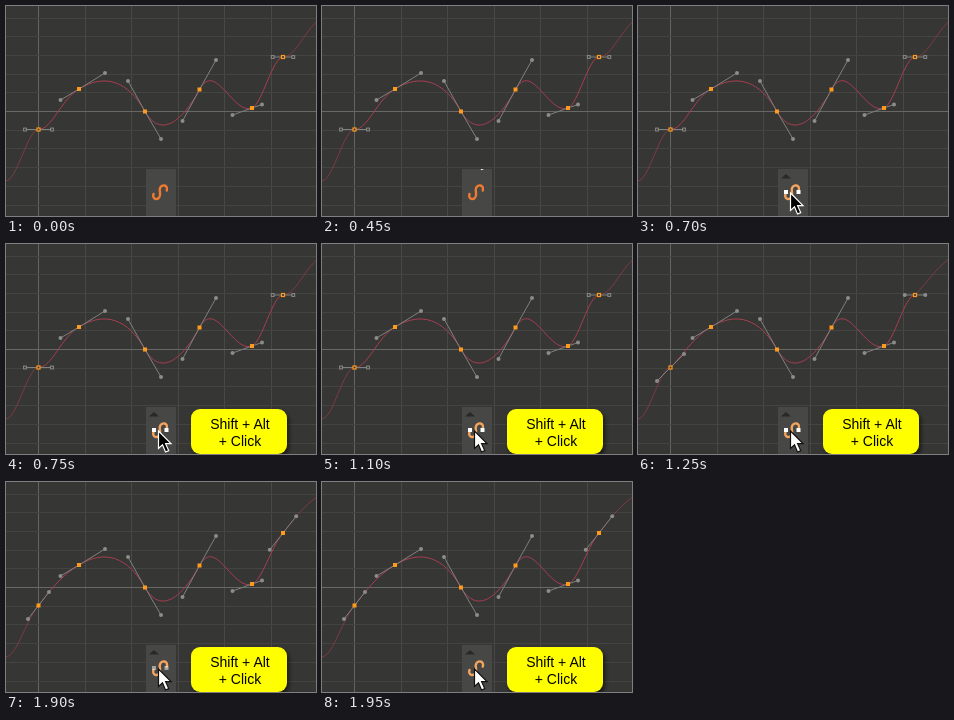
Write an HTML page that moves like this. It is 310 by 210 pixels and loops after 2.4 s.

```html
<!DOCTYPE html>
<html lang="en">
<head>
<meta charset="utf-8">
<title>Curve tangents</title>
<style>
html, body { margin: 0; width: 100%; height: 100%; overflow: hidden; background: #363634; }
svg { display: block; width: 310px; height: 210px; }
text { font: 14px "Liberation Sans", Arial, sans-serif; text-anchor: middle; }
</style>
</head>
<body>
<svg viewBox="0 0 310 210">
  <defs>
    <clipPath id="slot"><rect x="140" y="163" width="30" height="47"/></clipPath>
    <filter id="soft" x="-20%" y="-20%" width="140%" height="150%"><feGaussianBlur stdDeviation="2"/></filter>
  </defs>
  <g id="grid" shape-rendering="crispEdges"></g>
  <g fill="none" stroke="#a83e50">
    <path id="outside" opacity=".6"/>
    <path id="curve"/>
  </g>
  <g id="keys"></g>
  <rect x="140" y="163" width="30" height="47" fill="#474745"/>
  <path id="arrow" d="M143 172.5L148 168L153 172.5Z" fill="#292928"/>
  <path id="icon" d="M147.5 188C145.5 194 153.5 195 154 189C154.3 186 153.5 185 153.8 183C154.5 178 162.5 178 160.8 184.5" fill="none" stroke-width="2.4" stroke-linecap="round"/>
  <path id="grips" d="M146 184h4v4h-4zM158.5 184h4v4h-4z" fill="#fff"/>
  <g clip-path="url(#slot)">
    <path id="cursor" d="M0 0V17.5L4 13.8L7 21L10.2 19.6L7.1 12.7H12.5Z" stroke-width="1.2"/>
  </g>
  <g id="label">
    <rect x="187" y="168" width="96" height="45" rx="9" opacity=".55" filter="url(#soft)"/>
    <rect x="185" y="165" width="96" height="45" rx="9" fill="#ff0"/>
    <text x="234" y="185">Shift + Alt</text>
    <text x="234" y="202">+ Click</text>
  </g>
</svg>
<script>
const $ = id => document.getElementById(id);
const set = (id, name, value) => $(id).setAttribute(name, value);
const show = (id, on) => set(id, 'visibility', on ? 'visible' : 'hidden');
const ramp = (t, a, b) => Math.min(1, Math.max(0, (t - a) / (b - a)));
const mix = (a, b, p) => a + (b - a) * p;

const line = (x, y, w, h, c) => `<rect x="${x}" y="${y}" width="${w}" height="${h}" fill="${c}"/>`;
let grid = '';
for (let i = 0; i < 6; i++) grid += line(Math.round(32 + i * 46.5), 0, 1, 210, i ? '#484846' : '#646462');
for (let i = -5; i < 6; i++) grid += line(0, Math.round(105 + i * 18.7), 310, 1, i ? '#434341' : '#686866');
$('grid').innerHTML = grid;

// Each key: point, left handle, right handle
const inner = [
  [73, 83, 54.5, 94, 99, 67],
  [139, 105.5, 122, 75, 155, 133],
  [193.5, 83.5, 176.5, 115, 210, 54],
  [246, 102, 226.5, 109, 256, 98.5]
];

function keysAt(t) {
  const rise = ramp(t, 1100, 1250), narrow = ramp(t, 1250, 1350);
  const dx = mix(13.5, 10.5, narrow), dy = 13.5 * rise;
  const ex = mix(10.3, 13.2, narrow), ey = 16.7 * narrow;
  return [
    [32.5, 123.5, 32.5 - dx, 123.5 + dy, 32.5 + dx, 123.5 - dy],
    ...inner,
    [277, 51, 277 - ex, 51 + ey, 277 + ex, 51 - ey]
  ];
}

const segment = (a, b, dx = 0, dy = 0) =>
  `M${a[0] + dx} ${a[1] + dy}C${a[4] + dx} ${a[5] + dy} ${b[2] + dx} ${b[3] + dy} ${b[0] + dx} ${b[1] + dy}`;

const box = (x, y, r, look) =>
  `<rect x="${x - r}" y="${y - r}" width="${2 * r}" height="${2 * r}" ${look}/>`;

function drawKey([x, y, lx, ly, rx, ry], flat, hollow) {
  const tip = (x, y) => flat
    ? box(x, y, 1.4, 'fill="#363634" stroke="#8c8c8a"')
    : `<circle cx="${x}" cy="${y}" r="2" fill="#8c8c8a"/>`;
  return `<path d="M${lx} ${ly}L${x} ${y}L${rx} ${ry}" fill="none" stroke="#80807e"/>`
    + tip(lx, ly) + tip(rx, ry)
    + (hollow ? box(x, y, 1.5, 'fill="#363634" stroke="#ff9a1c" stroke-width="1.2"')
              : box(x, y, 2, 'fill="#ff9a1c"'));
}

function draw(t) {
  const keys = keysAt(t), last = keys.length - 1;
  const dx = keys[last][0] - keys[0][0], dy = keys[last][1] - keys[0][1];
  set('curve', 'd', keys.slice(1).map((k, i) => segment(keys[i], k)).join(''));
  // The curve repeats with an offset on both sides
  set('outside', 'd', segment(keys[3], keys[4], -dx, -dy)
    + segment(keys[4], keys[5], -dx, -dy) + segment(keys[0], keys[1], dx, dy));
  $('keys').innerHTML = keys.map((k, i) => {
    const end = i === 0 || i === last;
    return drawKey(k, end && t < 1150, end && t < 1350);
  }).join('');

  const hover = t >= 550, pressed = t >= 1100;
  show('arrow', hover);
  show('grips', hover && t < 1950);
  set('grips', 'opacity', t < 1900 ? 1 : .5);
  set('icon', 'stroke', hover ? '#f3a45f' : '#ee7b31');
  show('cursor', t >= 450);
  set('cursor', 'transform', `translate(152.5 ${mix(142.5, 187, ramp(t, 450, 700))})`);
  set('cursor', 'fill', pressed ? '#fff' : '#000');
  set('cursor', 'stroke', pressed ? '#111' : '#fff');
  show('label', t >= 750);
}

const start = performance.now();
function tick() {
  const t = (performance.now() - start) % 2400;
  draw(Math.floor(t / 50) * 50);
  requestAnimationFrame(tick);
}
tick();
</script>
</body>
</html>
```
